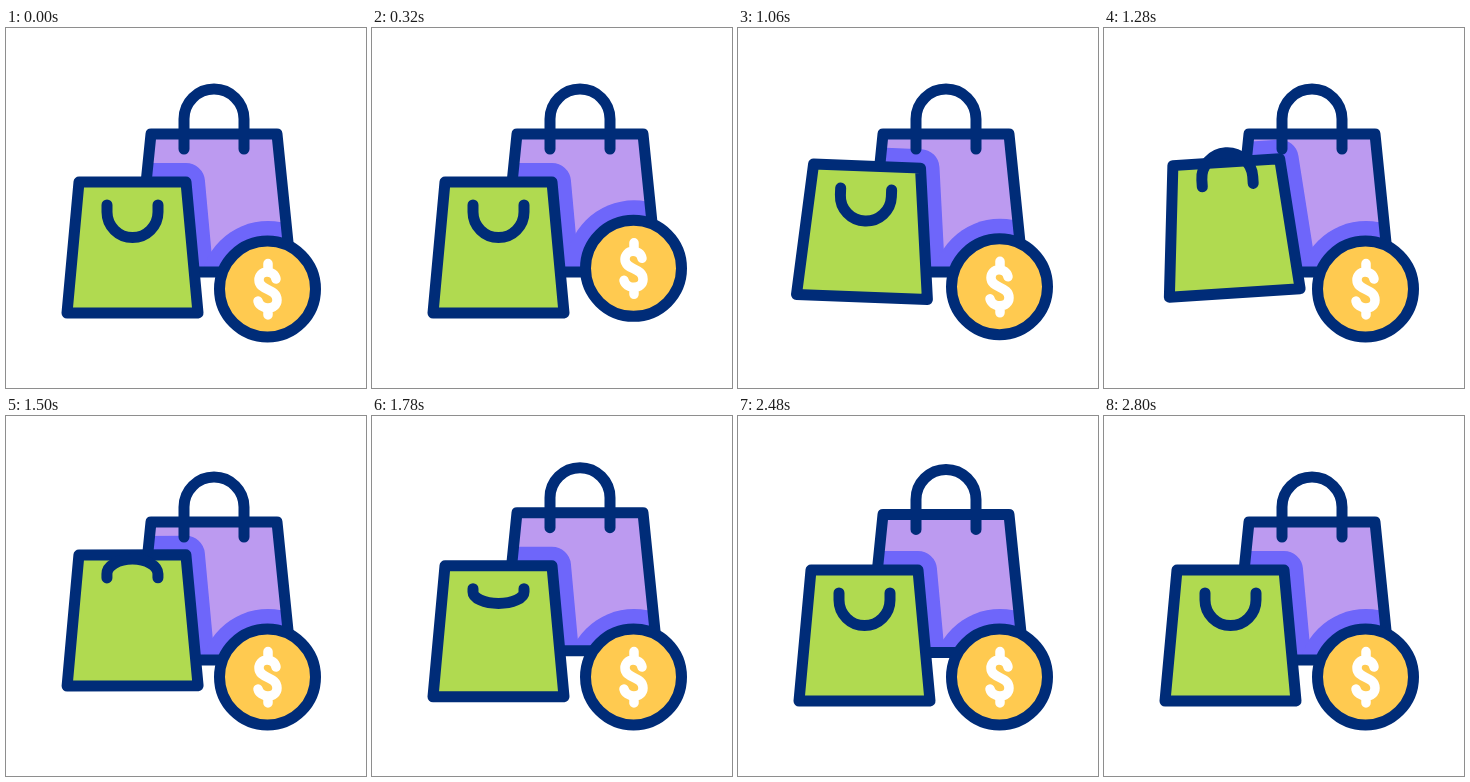
Animation, 360 px wide and 360 px high, one loop 2820 ms. Source, as an HTML page:

```html
<!DOCTYPE html>
<html lang="en">
<head>
<meta charset="utf-8">
<title>Shopping bags</title>
<style>
  html, body { margin: 0; height: 100%; overflow: hidden; background: #fff; }
  svg { display: block; width: 100vw; height: 100vh; }
  .line { fill: none; stroke: #002c78; stroke-width: 11; stroke-linecap: round; stroke-linejoin: round; }
  .shade { fill: #6e66fa; stroke: #6e66fa; stroke-linejoin: round; }
</style>
</head>
<body>
<svg viewBox="0 0 360 360">
  <defs>
    <path id="backShape" d="M145 106H271L285 244H131Z"/>
    <path id="frontShape" d="M73 154H180L192 285H61Z"/>
    <clipPath id="backClip"><use href="#backShape" class="back"/></clipPath>
  </defs>

  <use href="#backShape" class="back" fill="#bc9af0"/>
  <g clip-path="url(#backClip)">
    <use href="#frontShape" class="shade front" stroke-width="38"/>
    <circle class="shade coin" cx="262" cy="261" r="68" stroke-width="0"/>
  </g>
  <g class="back line">
    <use href="#backShape"/>
    <path d="M178 121V91a30 30 0 0 1 60 0v30"/>
  </g>

  <g class="front line">
    <use href="#frontShape" fill="#b0da50"/>
    <path id="handle"/>
  </g>

  <g class="coin">
    <circle class="line" cx="261.5" cy="261" r="48" style="fill:#ffca50"/>
    <path fill="none" stroke="#fff" stroke-width="9.5" stroke-linecap="round" stroke-linejoin="round"
      d="M270 251c-1-5-5-7-9-7-5 0-8 4-8 8 0 11 18 8 18 20 0 5-4 8-9 8-5 0-9-3-10-7M262 235.500v8M262 280v7"/>
  </g>
</svg>
<script>
const LOOP = 2820;

// Eased value at time t through [time, value] keys.
function track(t, keys) {
  if (t <= keys[0][0]) return keys[0][1];
  for (let i = 1; i < keys.length; i++) {
    const [t0, a] = keys[i - 1], [t1, b] = keys[i];
    if (t < t1) {
      const u = (t - t0) / (t1 - t0);
      return a + (b - a) * u * u * (3 - 2 * u);
    }
  }
  return keys[keys.length - 1][1];
}

const hop = (t, start, peak, fall, end, height) =>
  -track(t, [[start, 0], [peak, height], [fall, height], [end, 0]]);

const wiggle = (t, start) =>
  track(t, [[start, 0], [start + 167, 10], [start + 333, -10], [start + 500, 0]]);

function place(name, y, angle, pivot) {
  const transform = `translate(0 ${y}) rotate(${angle} ${pivot})`;
  document.querySelectorAll("." + name).forEach(el => el.setAttribute("transform", transform));
}

// k runs from 1 (hanging down) to -1 (standing up).
function bendHandle(k) {
  const ry = Math.max(Math.abs(25.5 * k), 0.01);
  handle.setAttribute("d",
    `M101 177v${7 * k}a25.5 ${ry} 0 0 ${k > 0 ? 0 : 1} 51 0v${-7 * k}`);
}

function draw(now) {
  const t = now % LOOP;
  place("coin", hop(t, 0, 400, 560, 1180, 23), 0, "262 261");
  place("front", hop(t, 790, 1170, 1264, 2000, 20), wiggle(t, 1010), "126.5 219.5");
  place("back", hop(t, 1600, 1980, 2064, 2780, 20), wiggle(t, 1810), "208 152");
  bendHandle(track(t, [[1050, 1], [1270, -1], [2050, 1]]));
}

const begin = performance.now();
function tick() {
  draw(performance.now() - begin);
  requestAnimationFrame(tick);
}
tick();
</script>
</body>
</html>
```
